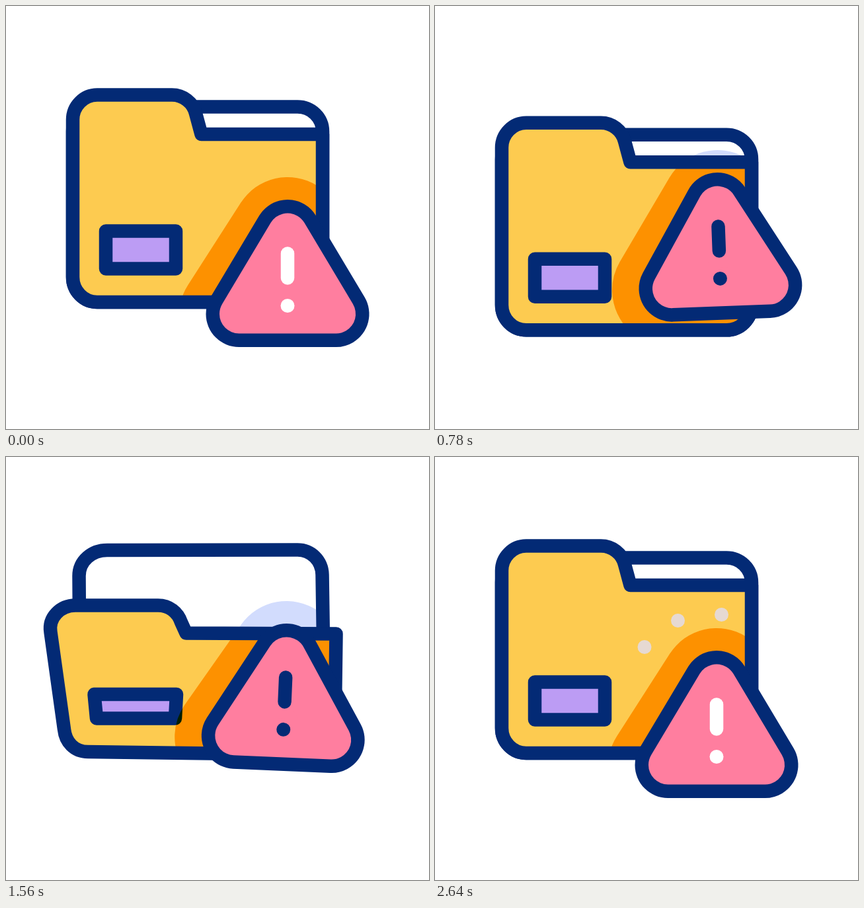
Write an HTML page with a canvas that moves like this. It is 640 by 640 pixels and loops after 3.12 s.

```html
<!DOCTYPE html>
<html lang="en">
<head>
<meta charset="utf-8">
<title>Folder warning</title>
<style>
  html, body { margin: 0; height: 100%; overflow: hidden; background: #fff; }
  canvas { display: block; }
</style>
</head>
<body>
<canvas id="stage" width="640" height="640"></canvas>
<script>
const ctx = document.getElementById('stage').getContext('2d');
const LOOP = 3120, LINE = 20.5;
const NAVY = '#032a75', YELLOW = '#fdcb50', PINK = '#ff7e9f', PURPLE = '#bc9cf4', PALE = '#d2dcfd';

// Closed and open outlines; each pair shares the same commands.
const FRONT = [
  'M101,172 C101,151.5 117.5,134.5 138,134.5 L251,134.5 C268,134.5 283,146 287,162.5 L295.5,194 L479,194 L479,410 C479,431 462,448 441,448 L138,448 C117.5,448 101,431 101,410 Z',
  'M67.5,265 C64,243 82,224.5 105,224.5 L230,224.5 C247,224.5 260,235 265,250 L272.5,266.5 L499.5,267.5 L497.5,412 C497,433 479,451 458,450.5 L124,446 C103,446 90,431 88,412 Z'
];
const BACK = [
  'M101,190 C101,169 117,152.5 138,152.5 L441,152.5 C462,152.5 479,169 479,190 L479,410 C479,431 462,448 441,448 L138,448 C117,448 101,431 101,410 Z',
  'M110.5,180 C110.5,157 130,141 153,141 L441,140.5 C462,140.5 478,157 478.5,178 L482,410 C482,431 462,448 441,448 L140,444 C121,444 112,431 112,412 Z'
];
const LABEL = [
  'M151,340.5 L257,340.5 L257,397.5 L151,397.5 Z',
  'M133.5,359 L258,359 L256,395.5 L137,395.5 Z'
];
const TRIANGLE = new Path2D('M426,343 L499.5,466 L352.5,466 Z');
const SHADOW = new Path2D('M426,343 L504,468 L347,468 Z');
const BAR = new Path2D('M426,374.5 V411.5');
const DOTS = [[317, 287.5], [367.5, 247.5], [433.5, 238.5]];

// Keys are [time, value], eased in and out between neighbours.
const LIFT = [[140, 0], [465, -60], [790, 42.5], [1125, 0]];
const OPEN = [[822, 0], [1322, 1], [1760, 1], [2260, 0]];
const RISE = [[140, 0], [660, -41], [1950, -41], [2280, 0]];
const TILT = [[322, 0], [614, 5], [872, -5], [1130, 5], [1388, -5], [1646, 5], [1904, -5], [2250, 0]];
const FADE = [[2350, 0], [2640, 1]];

function track(keys, t) {
  if (t <= keys[0][0]) return keys[0][1];
  for (let i = 1; i < keys.length; i++) {
    const [t0, a] = keys[i - 1], [t1, b] = keys[i];
    if (t < t1) {
      const u = (t - t0) / (t1 - t0);
      return a + (b - a) * u * u * (3 - 2 * u);
    }
  }
  return keys[keys.length - 1][1];
}

function morph([from, to], p) {
  const number = /\d+(\.\d+)?/g, ends = to.match(number);
  let i = 0;
  return new Path2D(from.replace(number, n => +n + (ends[i++] - n) * p));
}

function paint(path, fill, line, width = LINE) {
  if (fill) {
    ctx.fillStyle = fill;
    ctx.fill(path);
  }
  if (line) {
    ctx.strokeStyle = line;
    ctx.lineWidth = width;
    ctx.stroke(path);
  }
}

function disc(x, y, color) {
  ctx.fillStyle = color;
  ctx.beginPath();
  ctx.arc(x, y, 10.5, 0, 2 * Math.PI);
  ctx.fill();
}

function placeSign(rise, tilt) {
  ctx.translate(426, 308 + rise);
  ctx.rotate(tilt * Math.PI / 180);
  ctx.translate(-426, -308);
}

function draw(t) {
  const lift = track(LIFT, t), open = track(OPEN, t);
  const rise = track(RISE, t), tilt = track(TILT, t);
  const back = morph(BACK, open), front = morph(FRONT, open);

  const castShadow = (area, color, blend) => {
    ctx.save();
    ctx.clip(area);
    ctx.translate(0, -lift);
    placeSign(rise, tilt);
    // Fill and outline are merged by flat colour, or by one blended outline over a clipped core.
    const outline = new Path2D();
    const corners = [[426, 343, 84], [504, 468, 85], [347, 468, 85]];
    corners.forEach(([x, y, r], i) => {
      const [px, py] = corners[(i + 2) % 3], [nx, ny] = corners[(i + 1) % 3];
      const start = Math.atan2(y - py, x - px) - Math.PI / 2;
      const end = Math.atan2(ny - y, nx - x) - Math.PI / 2;
      outline.arc(x, y, r, start, end);
    });
    outline.closePath();
    ctx.globalCompositeOperation = blend;
    paint(outline, color);
    ctx.restore();
  };

  ctx.lineJoin = ctx.lineCap = 'round';
  ctx.fillStyle = '#fff';
  ctx.fillRect(0, 0, 640, 640);

  ctx.save();
  ctx.translate(0, lift);
  paint(back, '#fff');
  castShadow(back, PALE, 'source-over');
  paint(back, null, NAVY);
  paint(front, YELLOW);
  paint(morph(LABEL, open), PURPLE, NAVY);
  castShadow(front, '#ffb600', 'multiply');
  paint(front, null, NAVY);
  ctx.restore();

  ctx.globalAlpha = track(FADE, t);
  DOTS.forEach(([x, y]) => disc(x, y, '#e6d9d2'));
  ctx.globalAlpha = 1;

  ctx.save();
  placeSign(rise, tilt);
  paint(TRIANGLE, NAVY, NAVY, 100);
  paint(TRIANGLE, PINK, PINK, 59);
  const mark = t >= 660 && t < 1950 ? NAVY : '#fff';
  paint(BAR, null, mark);
  disc(426, 453.5, mark);
  ctx.restore();
}

function tick() {
  draw(performance.now() % LOOP);
  requestAnimationFrame(tick);
}
tick();
</script>
</body>
</html>
```
